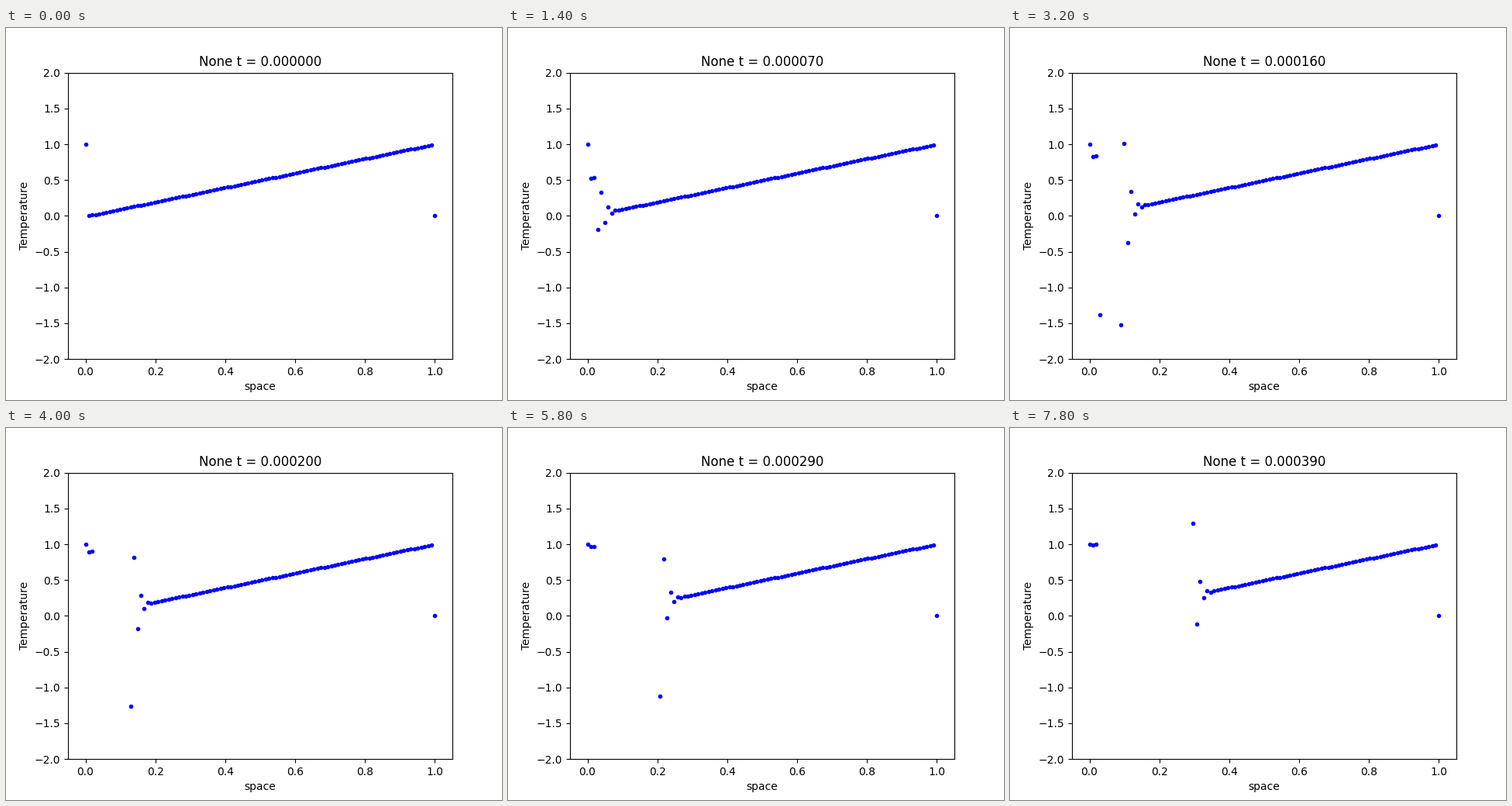
These frames come from a looping animation (640 px wide and 480 px high, 8 s). A matplotlib script:

```python
import numpy as np
import matplotlib.pyplot as plt
from matplotlib.animation import FuncAnimation

N = 100          # interior nodes
STEPS = 40
DT = 1e-5
R = 0.1          # dt / dx^2


def start():
    u = np.zeros(N + 2)
    u[0] = 1.0
    u[1:-1] = np.arange(N) / N
    return u


def step(u):
    """One explicit step with a backward (unstable) second difference."""
    new = u.copy()
    bend = u[:-2] - 2 * u[1:-1] + u[2:]
    new[1] += R * bend[0]
    new[2:-1] += R * bend[:-1]
    return new


states = [start()]
for _ in range(STEPS - 1):
    states.append(step(states[-1]))

x = np.linspace(0, 1, N + 2)
fig, ax = plt.subplots(figsize=(6.4, 4.8), dpi=100)
dots, = ax.plot(x, states[0], "b.")
ax.set_ylim(-2, 2)
ax.set_xlabel("space")
ax.set_ylabel("Temperature")
title = ax.set_title("")


def draw(i):
    dots.set_data(x, states[i])
    title.set_text(f"None t = {i * DT:.6f}")
    return dots, title


anim = FuncAnimation(fig, draw, frames=STEPS, interval=200,
                     repeat=True, repeat_delay=0, blit=False)
plt.show()
```
